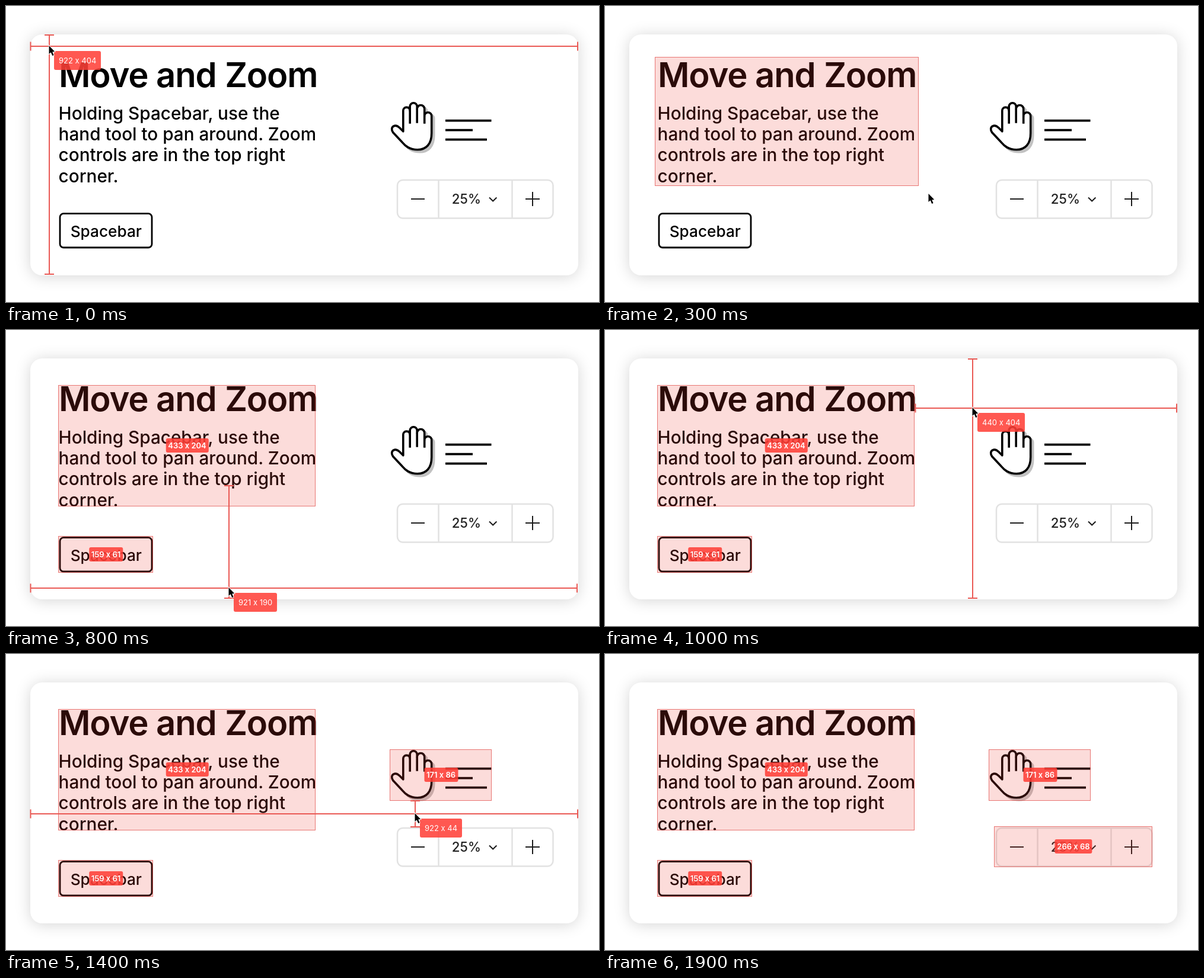
An HTML page that plays this animation: 1000x500 px, repeating every 2 s.

```html
<!DOCTYPE html>
<html lang="en">
<head>
<meta charset="utf-8">
<title>Move and Zoom</title>
<style>
  html, body { margin: 0; width: 100%; height: 100%; overflow: hidden; background: #fff; }
  #stage {
    position: relative; width: 1000px; height: 500px; overflow: hidden; background: #fff;
    font-family: Inter, "Liberation Sans", sans-serif; font-optical-sizing: none;
  }
  #card {
    position: absolute; left: 41px; top: 48px; width: 924px; height: 407px;
    border-radius: 20px; background: #fff; box-shadow: 0 2px 26px rgba(0, 0, 0, .17);
  }
  svg { position: absolute; left: 0; top: 0; }
  svg text { font-weight: 500; }
  .title { font-size: 58px; font-weight: 600; letter-spacing: -.02em; }
  .body { font-size: 29.7px; }
  .ink { fill: none; stroke: #000; stroke-width: 3.6; }
  .control { fill: none; stroke: #e2e2e2; stroke-width: 2.5; }
  .icon { fill: none; stroke: #1c1c1c; stroke-width: 2; }
  .area { fill: rgba(235, 60, 50, .18); stroke: rgba(222, 56, 52, .65); }
  .drag { fill: none; stroke: #d9625e; stroke-dasharray: 4 3; }
  .cross { fill: none; stroke: #ea5a55; stroke-width: 2; }
  .tag {
    position: absolute; border-radius: 3px; background: rgba(255, 64, 56, .87);
    color: #fff; font-size: 13px; white-space: nowrap;
  }
  .size { height: 24px; padding: 0 4px; line-height: 24px; font-weight: 600; transform: translate(-50%, -50%); }
  #hint { height: 32px; padding: 0 8px; line-height: 33px; }
</style>
</head>
<body>
<div id="stage">
  <div id="card"></div>
  <svg width="1000" height="500">
    <text class="title" y="137"><tspan x="89">Move</tspan><tspan x="253">and</tspan><tspan x="369.2">Zoom</tspan></text>
    <g class="body">
      <text x="88.6" y="191.5">Holding Spacebar, use the</text>
      <text x="88.6" y="226.8">hand tool to pan around. Zoom</text>
      <text x="88.6" y="262.2">controls are in the top right</text>
      <text x="88.6" y="297.5">corner.</text>
    </g>
    <rect class="ink" x="91" y="350.7" width="155" height="57.3" rx="6" style="stroke-width:2.8"/>
    <text x="168.8" y="390" font-size="26.2" text-anchor="middle">Spacebar</text>

    <defs>
      <path id="palm" d="M669 211V176a5.7 5.7 0 0 1 11.4 0V169a6 6 0 0 1 12 0V173a6.2 6.2 0 0 1 12.5 0V185a6 6 0 0 1 12 0V214C717 232 708 242 693 242C680 242 673 236 667 229L652 213C649 209 649 204 653 202C657 200 660 202 663 205Z"/>
    </defs>
    <g transform="translate(.8 .8)">
      <use href="#palm" x="4" y="4" fill="#c2c2c2" stroke="#c2c2c2" stroke-width="3.6"/>
      <use href="#palm" fill="#fff" stroke="#000" stroke-width="3.6" stroke-linejoin="round"/>
      <path class="ink" d="M680.4 169V198M692.4 173V197M704.9 185V198"/>
    </g>
    <path class="ink" d="M741 193.6H818.5M741 209.6H787M741 225.6H811"/>

    <rect class="control" x="660" y="294" width="262.5" height="64.5" rx="9"/>
    <path class="control" d="M729.5 294V358M853.5 294V358"/>
    <path class="icon" d="M683 326H706M876 326H900M888 314V338M815 323.5l6.2 6l6.2 -6"/>
    <text x="776.4" y="334.4" font-size="22.2" text-anchor="middle" fill="#222">25%</text>
  </svg>
  <svg id="marks" width="1000" height="500">
    <rect id="drag" class="drag"/>
    <path id="cross" class="cross"/>
  </svg>
  <div id="hint" class="tag"></div>
  <svg width="1000" height="500">
    <path id="cursor" d="M-.5 -1V13L2.7 10.2L5.2 16L7.6 15L5.2 9.4L9.2 9.1Z" stroke="#fff" stroke-width="1.6" paint-order="stroke"/>
  </svg>
</div>
<script>
const STEP = 100, SNAP = 0.71;

// Snapped areas: x, y, width, height
const targets = [
  [88.5, 93.5, 433, 204],
  [88.5, 348.5, 159, 61],
  [647.5, 161.5, 171, 86],
  [656.5, 291.5, 266, 68]
];

// cross: x, y, left, right, top, bottom; drag and snap: x0, y0, x1, y1
const steps = [
  ["cross", 73, 68, 41, 964, 49, 453],
  ["drag", 74, 69, 325, 205],
  ["drag", 74, 69, 524, 306],
  ["snap", 74, 69, 546, 318],
  ["cross", 310, 324, 41, 657, 263, 453],
  ["cross", 76, 326, 41, 657, 49, 453],
  ["drag", 76, 327, 255, 420],
  ["snap", 76, 327, 272, 428],
  ["cross", 376, 436, 41, 963, 263, 453],
  ["cross", 560, 262, 441, 964, 49, 453],
  ["cross", 620, 132, 523, 964, 49, 453],
  ["drag", 620, 133, 752, 178],
  ["drag", 620, 133, 855, 275],
  ["snap", 620, 133, 855, 275],
  ["cross", 690, 270, 41, 964, 248, 292],
  ["drag", 627, 270, 815, 306],
  ["drag", 627, 270, 944, 391],
  ["snap", 627, 270, 944, 391],
  ["cross", 958, 276, 144, 964, 49, 453],
  ["idle"]
];

const $ = id => document.getElementById(id);
const stage = $("stage"), marks = $("marks"), drag = $("drag");
const cross = $("cross"), hint = $("hint"), cursor = $("cursor");
const show = (el, on) => { el.style.display = on ? "" : "none"; };
const crisp = v => Math.floor(v) + 0.5;

function setRect(el, [x, y, width, height]) {
  for (const [k, v] of Object.entries({ x, y, width, height })) el.setAttribute(k, v);
}

const areas = targets.map(([x, y, w, h]) => {
  const rect = document.createElementNS("http://www.w3.org/2000/svg", "rect");
  rect.setAttribute("class", "area");
  marks.insertBefore(rect, drag);
  const tag = document.createElement("div");
  tag.className = "tag size";
  tag.textContent = `${w} x ${h}`;
  tag.style.left = x + w / 2 + 0.5 + "px";
  tag.style.top = Math.floor(y + h / 2) + "px";
  stage.insertBefore(tag, marks.nextSibling);
  return { rect, tag };
});

function crossPath(x, y, l, r, t, b) {
  const capX = v => `M${v} ${y - 7.5}V${y + 7.5}`;
  const capY = v => `M${x - 8} ${v}H${x + 8}`;
  return `M${l} ${y}H${r}M${x} ${t}V${b}` + capX(l + 0.5) + capX(r) + capY(t) + capY(b);
}

function draw(index) {
  const [kind, ...p] = steps[index];
  const done = steps.slice(0, index).filter(s => s[0] === "snap").length;
  const snapping = kind === "snap";

  areas.forEach(({ rect, tag }, i) => {
    const active = snapping && i === done;
    show(rect, i < done || active);
    show(tag, i < done);
    if (!active) return setRect(rect, targets[i]);
    const from = [p[0], p[1], p[2] - p[0], p[3] - p[1]];
    setRect(rect, from.map((v, k) => {
      const eased = v + (targets[i][k] - v) * SNAP;
      return k < 2 ? crisp(eased) : Math.round(eased);
    }));
  });

  show(cross, kind === "cross");
  show(drag, kind === "drag");
  show(hint, kind === "cross" || kind === "drag");
  show(cursor, kind !== "idle");
  if (kind === "idle") return;

  const [x, y] = kind === "cross" ? p : p.slice(2);
  cursor.setAttribute("transform", `translate(${x} ${y})`);
  hint.style.left = x + 8 + "px";
  hint.style.top = y + 8 + "px";

  if (kind === "cross") {
    cross.setAttribute("d", crossPath(...p));
    hint.textContent = `${p[3] - p[2] - 1} x ${p[5] - p[4]}`;
  } else if (kind === "drag") {
    const w = x - p[0], h = y - p[1];
    setRect(drag, [p[0] - 0.5, p[1] - 0.5, w, h]);
    hint.textContent = `${w} x ${h}`;
  }
}

const start = performance.now();
let last = -1;
function tick() {
  const index = Math.floor((performance.now() - start) / STEP) % steps.length;
  if (index !== last) draw(last = index);
  requestAnimationFrame(tick);
}
tick();
</script>
</body>
</html>
```
